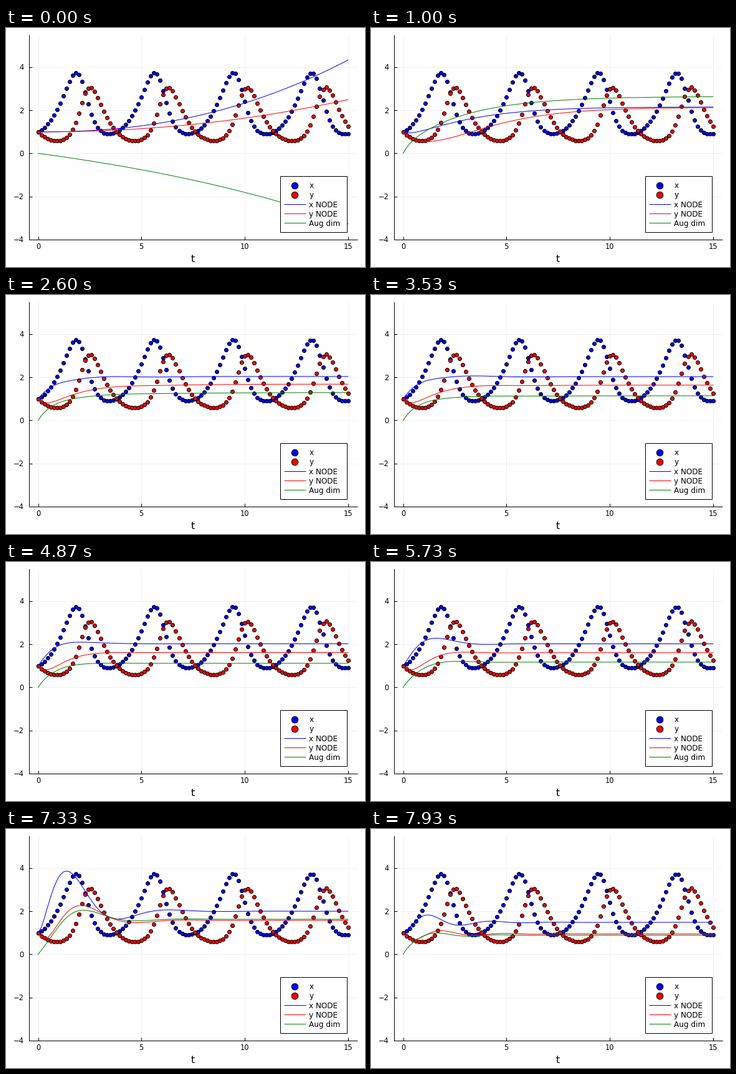
Recreate the animation shown at these times as a matplotlib script. Size 576 by 384 pixels, loop 8000 ms.

```python
import numpy as np
import matplotlib.pyplot as plt
from matplotlib.animation import FuncAnimation
from matplotlib.patches import Rectangle

W, H, DPI = 576, 384, 96
PX = 72 / DPI                      # one pixel in points
LEFT, RIGHT, TOP, BOTTOM = 36.6, 563.6, 11.4, 339.7
XLIM, YLIM = (-0.45, 15.45), (-4, 5.5)
FRAMES, LOOP = 120, 8000
SETTLED, SWUNG, COLLAPSE = 15, 99, 118     # turning points of the training
COLORS = ("blue", "red", "green")
STARTS = (1, 1, 0)

t = np.linspace(0, 15, 100)


def lotka_volterra(steps=20):
    def rate(u):
        x, y = u
        return np.array([1.5 * x - x * y, x * y - 2 * y])

    u, h = np.array([1.0, 1.0]), (t[1] - t[0]) / steps
    path = [u]
    for _ in t[1:]:
        for _ in range(steps):
            a = rate(u)
            b = rate(u + h / 2 * a)
            c = rate(u + h / 2 * b)
            d = rate(u + h * c)
            u = u + h / 6 * (a + 2 * b + 2 * c + d)
        path.append(u)
    return np.array(path).T


def ringing(decay, freq, ends, peaks, heights):
    """Damped swings: each curve overshoots its end by height at time peak."""
    lag = np.arctan(freq / decay) / freq

    def wave(s):
        return np.exp(-decay * s) * np.sin(freq * s)

    curves = []
    for start, end, peak, height in zip(STARTS, ends, peaks, heights):
        zero, size = peak - lag, height / wave(lag)
        jump = start - end - size * wave(-zero)
        curves.append(end + size * wave(t - zero) + jump * np.exp(-3 * t))
    return np.array(curves)


slow, quick = np.exp(-t / 2), np.exp(-3 * t)
opening = np.array([1 + 3.34 * (t / 15) ** 2.25,
                    1 + 1.5 * (t / 15) ** 2.1,
                    1.98 * (1 - np.exp(0.065 * t))])
settled = np.array([2.16 - (1.36 + 0.45 * t) * slow + 0.2 * quick,
                    2.14 - (1.14 + 1.45 * t) * slow,
                    2.65 - 2.3 * np.exp(-t / 3) - 0.35 * quick])
calm = ringing(1.2, 0.8, (2.03, 1.615, 1.12), (1.9, 4, 3.3), (0.1, 0.009, 0.01))
swing = ringing(0.7, 1.28, (2.02, 1.6, 1.35), (1.45, 2.3, 2.3), (0.86, 0.25, 0.18))
collapsed = ringing(0.6, 2.05, (1.49, 0.95, 0.89), (1.2, 1.85, 1.6), (0.34, 0.15, 0.11))


def predict(n):
    if n >= COLLAPSE:
        return collapsed
    growth = 1.25 * np.exp((n - SWUNG) / 14.5) - 0.25
    late = calm + growth * (swing - calm)
    early = np.exp(-max(n - SETTLED, 0) / 11.8)
    kick = (1 + n) * (1 - n / SETTLED) * np.exp(-n / 4)
    return late + early * (settled - late) + kick * (opening - settled)


def to_px(x, y):
    return (LEFT + (x - XLIM[0]) / (XLIM[1] - XLIM[0]) * (RIGHT - LEFT),
            BOTTOM - (y - YLIM[0]) / (YLIM[1] - YLIM[0]) * (BOTTOM - TOP))


plt.rcParams["font.family"] = "DejaVu Sans"
fig = plt.figure(figsize=(W / DPI, H / DPI), dpi=DPI, facecolor="white")


def stage(z):
    ax = fig.add_axes([0, 0, 1, 1], zorder=z)
    ax.set(xlim=(0, W), ylim=(H, 0))
    ax.axis("off")
    return ax


back, front = stage(0), stage(2)
plot = fig.add_axes([LEFT / W, 1 - BOTTOM / H, (RIGHT - LEFT) / W,
                     (BOTTOM - TOP) / H], zorder=1)
plot.set(xlim=XLIM, ylim=YLIM)
plot.axis("off")


def stroke(ax, xs, ys, color="black"):
    ax.plot(xs, ys, color=color, lw=PX, solid_capstyle="butt", zorder=4)


def label(x, y, s, size=11.5, ha="center"):
    front.text(x, y, s, fontsize=size * PX, ha=ha, va="baseline", zorder=4)


def dots(ax, xs, ys, color, size):
    ax.plot(xs, ys, "o", ms=size * PX, mfc=color, mec="black", mew=PX, zorder=4)


# Grid, axes and ticks
for v in range(0, 16, 5):
    x = to_px(v, 0)[0]
    stroke(back, [x, x], [TOP, BOTTOM], "#f0f0f0")
    stroke(front, [x, x], [BOTTOM, BOTTOM - 5])
    label(x, 355, str(v))
for v in range(-4, 5, 2):
    y = to_px(0, v)[1]
    stroke(back, [LEFT, RIGHT], [y, y], "#f0f0f0")
    stroke(front, [LEFT, LEFT + 5], [y, y])
    label(28.5, y + 4.2, str(v).replace("-", "\u2212"), ha="right")
stroke(front, [LEFT, LEFT], [TOP, BOTTOM])
stroke(front, [LEFT, RIGHT], [BOTTOM, BOTTOM])
label(300, 375.5, "t", 16)

# Legend
front.add_patch(Rectangle((439.5, 237.8), 107, 90.5, fc="white", ec="black",
                          lw=PX, zorder=3))
for i, name in enumerate(("x", "y", "x NODE", "y NODE", "Aug dim")):
    y = 253 + 15.1 * i
    if i < 2:
        dots(front, [462.9], [y], COLORS[i], 10.5)
    else:
        stroke(front, [445.5, 480.5], [y, y], COLORS[i - 2])
    label(486.5, y + 4.3, name, 12, ha="left")

for series, color in zip(lotka_volterra(), COLORS):
    dots(plot, t, series, color, 6)
lines = [plot.plot(t, u, color=c, lw=PX, zorder=5)[0]
         for u, c in zip(predict(0), COLORS)]


def update(n):
    for line, u in zip(lines, predict(n)):
        line.set_ydata(u)
    return lines


anim = FuncAnimation(fig, update, frames=FRAMES, interval=LOOP / FRAMES,
                     repeat=True, repeat_delay=0)
plt.show()
```
